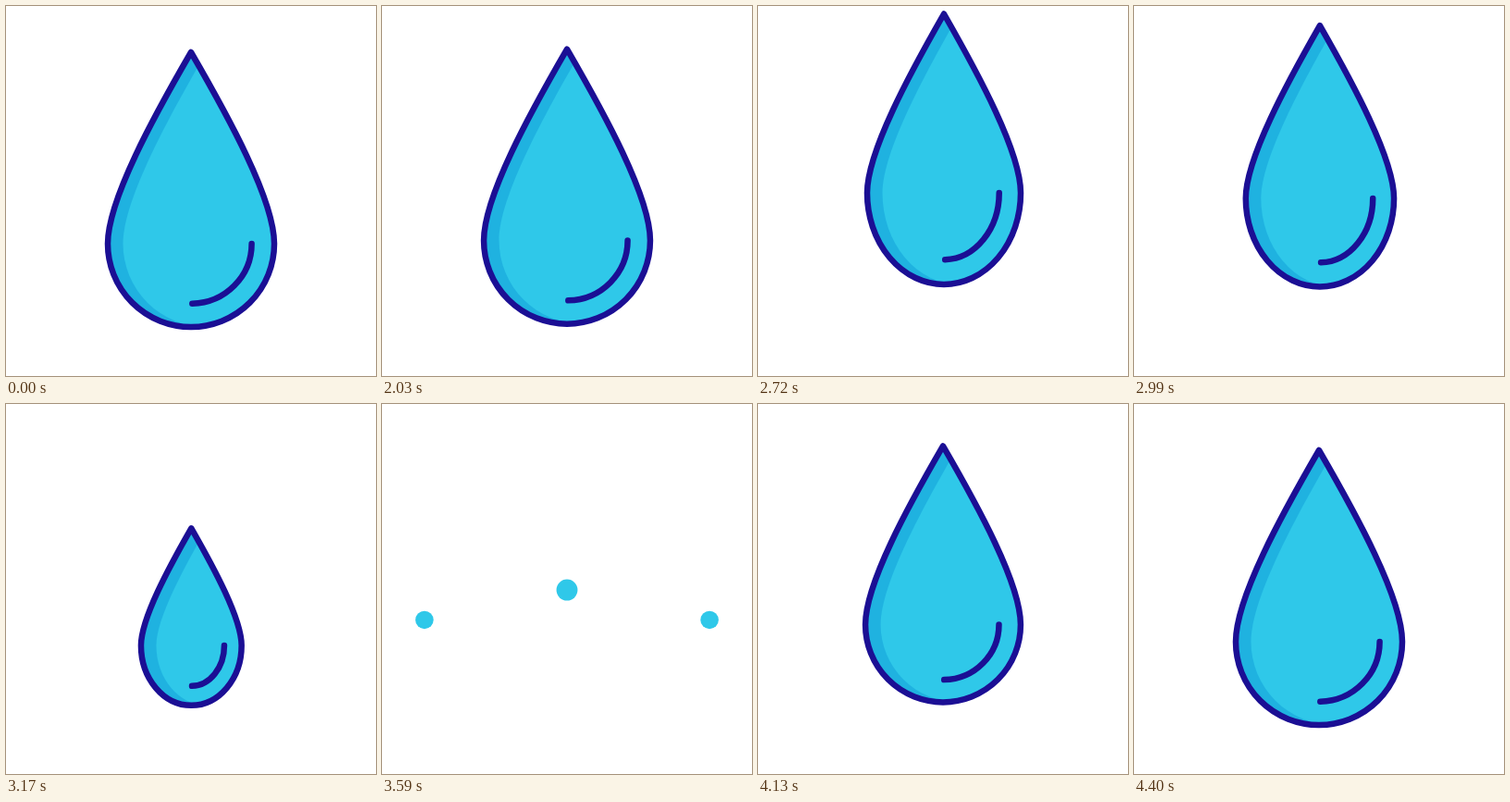
These frames come from a looping animation (400 px wide and 400 px high, 4430 ms). An HTML page with a canvas:

```html
<!DOCTYPE html>
<html lang="en">
<head>
<meta charset="utf-8">
<title>Water drop</title>
<style>
  html, body { margin: 0; width: 100%; height: 100%; overflow: hidden; background: #fff; }
  canvas { display: block; width: 400px; height: 400px; }
</style>
</head>
<body>
<canvas id="stage" width="400" height="400"></canvas>
<script>
const ctx = document.getElementById('stage').getContext('2d');

const LOOP = 4430, STEP = 30;
const INK = '#1b0f94', WATER = '#2fc8e9', SHADE = '#1fb2e0';

// x, y: centre of the round part; up: height to the tip; rx, ry: round part
const REST = { x: 200, y: 257, up: 207, rx: 90, ry: 90 };
const PEAK = { x: 201, y: 202, up: 193.5, rx: 83, ry: 99 };
const SUNK = { x: 199, y: 373, up: 0, rx: 0, ry: 0 };
const ABOVE = { x: 200, y: -17, up: 0, rx: 0, ry: 0 };

// Phase times in ms
const RISE = 2000, FALL = 2720, SPLASH = 3290, RETURN = 3607, END = 4400;

const lerp = (a, b, k) => a + (b - a) * k;
const span = (t, a, b) => Math.min(1, Math.max(0, (t - a) / (b - a)));
const easeIn = (k, p) => k ** p;
const easeOut = (k, p) => 1 - (1 - k) ** p;

function mix(a, b, k) {
  const pose = {};
  for (const key in a) pose[key] = lerp(a[key], b[key], k);
  return pose;
}

function dropPose(t) {
  if (t < RISE) return REST;
  if (t < FALL) {
    const k = span(t, RISE, FALL);
    const pose = mix(REST, PEAK, easeIn(k, 1.5));
    pose.y = lerp(REST.y, PEAK.y, easeOut(k, 1.5));
    return pose;
  }
  if (t < SPLASH) return mix(PEAK, SUNK, easeIn(span(t, FALL, SPLASH), 4.5));
  if (t < RETURN) return null;
  return mix(ABOVE, REST, easeOut(span(t, RETURN, END), 2.5));
}

function outline({ x, y, up, rx, ry }) {
  const path = new Path2D();
  path.moveTo(x, y - up);
  path.bezierCurveTo(x + rx * .444, y - up * .667, x + rx, y - up * .229, x + rx, y);
  path.ellipse(x, y, rx, ry, 0, 0, Math.PI);
  path.bezierCurveTo(x - rx, y - up * .229, x - rx * .444, y - up * .667, x, y - up);
  path.closePath();
  return path;
}

function drawDrop(pose) {
  if (!pose || pose.rx < 1) return;
  const body = outline(pose);
  ctx.fillStyle = SHADE;
  ctx.fill(body);

  ctx.save();
  ctx.clip(body);
  ctx.translate(16.5, 0);
  ctx.fillStyle = WATER;
  ctx.fill(body);
  ctx.restore();

  ctx.strokeStyle = INK;
  ctx.lineWidth = 6.5;
  ctx.lineCap = ctx.lineJoin = 'round';
  ctx.stroke(body);

  const ax = pose.rx * .84 - 10, ay = pose.ry * .83 - 10;
  if (ax < 1 || ay < 1) return;
  ctx.beginPath();
  ctx.ellipse(pose.x, pose.y, ax, ay, 0, 0, Math.PI / 2 - .02);
  ctx.stroke();
}

function drawBead(t, { side, reach, top, low, r, end }) {
  if (t < SPLASH || t >= end) return;
  const turn = 3610;
  const x = 200 + side * reach * easeOut(span(t, SPLASH, end), 3.5);
  const y = t < turn
    ? lerp(350, top, easeOut(span(t, SPLASH, turn), 2))
    : lerp(top, low, easeIn(span(t, turn, end), 2));
  const size = r * (1 - easeIn(span(t, SPLASH, end), 3.1));
  ctx.fillStyle = WATER;
  ctx.beginPath();
  ctx.arc(x, y, size, 0, Math.PI * 2);
  ctx.fill();
}

const BEADS = [
  { side: -1, reach: 170, top: 233, low: 300, r: 11, end: 3900 },
  { side: 0, reach: 0, top: 200.5, low: 285, r: 12.5, end: 3960 },
  { side: 1, reach: 170, top: 233, low: 300, r: 11, end: 3900 }
];

function draw(now) {
  const t = Math.floor((now % LOOP + 10) / STEP) * STEP - 10;
  ctx.fillStyle = '#fff';
  ctx.fillRect(0, 0, 400, 400);
  for (const bead of BEADS) drawBead(t, bead);
  drawDrop(dropPose(t));
}

const start = performance.now();
function tick() {
  draw(performance.now() - start);
  requestAnimationFrame(tick);
}
tick();
</script>
</body>
</html>
```
